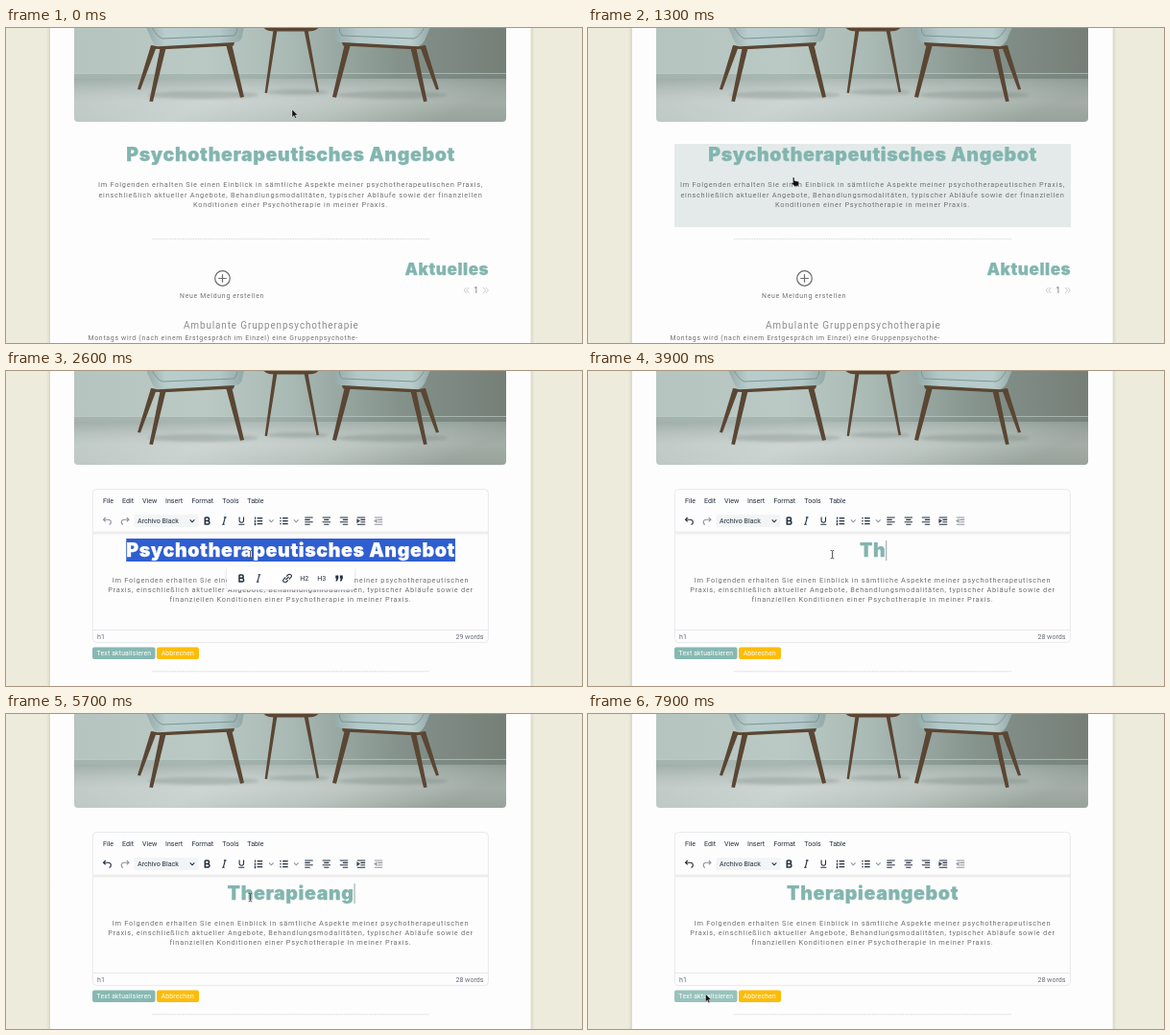
These frames come from a looping animation (600 px wide and 329 px high, 8000 ms). An HTML page:

```html
<!DOCTYPE html>
<html lang="de">
<head>
<meta charset="utf-8">
<title>Text bearbeiten</title>
<style>
html, body { margin: 0; width: 100%; height: 100%; overflow: hidden; background: #edeadc; }
svg { display: block; width: 100vw; height: 100vh; }
text { font-family: Roboto, "Liberation Sans", sans-serif; white-space: pre; }
.h { font-family: Inter, Roboto, sans-serif; font-weight: 900; font-size: 19.6px; letter-spacing: .6px; fill: #82b5af; stroke: #82b5af; stroke-width: .25; text-anchor: middle; }
.h.sel { fill: #fff; stroke: #fff; }
.p { font-size: 7.4px; letter-spacing: .735px; fill: #707070; text-anchor: middle; }
.s { font-size: 6.9px; letter-spacing: .71px; fill: #707070; }
.m { font-size: 7.1px; fill: #222f3e; }
.b { font-size: 6.8px; letter-spacing: .2px; fill: #fff; }
.i { fill: none; stroke: #222f3e; stroke-width: 1.1; }
.wood { fill: #5a4633; }
.thin { fill: none; stroke: #e3e4e6; stroke-width: .8; }
</style>
</head>
<body>
<svg viewBox="0 0 600 329" preserveAspectRatio="none">
  <defs>
    <linearGradient id="wall">
      <stop offset="0" stop-color="#b5c4bf"/><stop offset=".3" stop-color="#bac9c4"/>
      <stop offset=".5" stop-color="#a9b9b4"/><stop offset=".75" stop-color="#84928b"/>
      <stop offset="1" stop-color="#757f78"/>
    </linearGradient>
    <linearGradient id="floor" x2="1" y2=".2">
      <stop offset="0" stop-color="#b2beba"/><stop offset=".4" stop-color="#c5cfcc"/>
      <stop offset=".72" stop-color="#b3beb9"/><stop offset="1" stop-color="#949f98"/>
    </linearGradient>
    <linearGradient id="sheen" x2="0" y2="1">
      <stop offset="0" stop-color="#70817b" stop-opacity=".28"/><stop offset=".55" stop-color="#fff" stop-opacity=".14"/>
      <stop offset="1" stop-color="#fff" stop-opacity=".04"/>
    </linearGradient>
    <linearGradient id="seat" x2="1">
      <stop offset="0" stop-color="#94a9a8"/><stop offset=".2" stop-color="#b9cdcd"/>
      <stop offset=".75" stop-color="#b2c8c8"/><stop offset="1" stop-color="#92a8a7"/>
    </linearGradient>
    <linearGradient id="edge">
      <stop offset="0" stop-color="#8a8670" stop-opacity="0"/><stop offset="1" stop-color="#8a8670" stop-opacity=".2"/>
    </linearGradient>
    <filter id="soft" x="-20%" y="-40%" width="140%" height="180%"><feGaussianBlur stdDeviation="1.8"/></filter>
    <clipPath id="photo"><rect x="71" y="-10" width="450" height="108" rx="4"/></clipPath>
  </defs>

  <rect width="600" height="329" fill="#edebdc"/>
  <rect x="42" width="4" height="329" fill="url(#edge)"/>
  <rect width="4" height="329" fill="url(#edge)" transform="translate(550.5 0) scale(-1 1)"/>
  <rect x="46" width="500.5" height="329" fill="#fefdfe"/>

  <g clip-path="url(#photo)">
    <rect x="71" width="450" height="54" fill="url(#wall)"/>
    <rect x="71" y="47" width="450" height="6" fill="#7a8a84" opacity=".3"/>
    <rect x="71" y="47" width="450" height="1" fill="#d5dfdb" opacity=".5"/>
    <rect x="71" y="53" width="450" height="45" fill="url(#floor)"/>
    <rect x="71" y="53" width="450" height="45" fill="url(#sheen)"/>
    <g fill="#66756f" opacity=".28" filter="url(#soft)">
      <ellipse cx="205" cy="70" rx="58" ry="4"/><ellipse cx="304" cy="67" rx="32" ry="3"/>
      <ellipse cx="402" cy="70" rx="58" ry="4"/>
    </g>
    <g id="chair">
      <path class="wood" d="M151 18L157 19L140 64.5L137 64ZM161 19L167 19L153 77L149.3 76.5ZM229 17L235 16L248 72L244 72.8Z"/>
      <path fill="url(#seat)" d="M146 -1H248L246 9Q245 14 239 15L163 20Q156 20 152 13Z"/>
      <path class="wood" d="M152 18.5Q156 19.5 163 19L238 15L237 18.5L164 22.3L151 21.5Z"/>
      <path d="M152 -1Q157 9 163 11L238 8Q241 4 241 -1" fill="none" stroke="#7f9493" stroke-width="1"/>
    </g>
    <use href="#chair" transform="translate(588 0) scale(-1 1)"/>
    <path class="wood" d="M278.5 2H282.5L272 68L269.6 67.8ZM310.5 2H314.5L326 66.8L323.6 67.2Z"/>
    <path class="wood" d="M267 -2H327Q324 3.5 314 3.5H280Q270 3.5 267 -2Z"/>
  </g>

  <g id="view">
    <rect id="hover" x="90" y="121" width="413" height="87" fill="#e4eae9"/>
    <text class="h" x="296.6" y="139.3">Psychotherapeutisches Angebot</text>
    <g id="intro"></g>
    <path d="M152 220.3H441" stroke="#cfcfcf" stroke-width=".8" stroke-dasharray="1 .6"/>
    <circle cx="225.5" cy="261.5" r="7.8" fill="none" stroke="#6b6b6b" stroke-width="1.2"/>
    <path d="M221.2 261.5H229.8M225.5 257.2V265.8" stroke="#6b6b6b" stroke-width="1.2"/>
    <text class="s" x="181" y="281.8">Neue Meldung erstellen</text>
    <text class="h" x="459.3" y="257.8" style="font-size:17px">Aktuelles</text>
    <path d="M479.6 271L477 274L479.6 277M482.4 271L479.8 274L482.4 277M497 271L499.6 274L497 277M499.8 271L502.4 274L499.8 277" fill="none" stroke="#c4c4c4" stroke-width=".9"/>
    <text x="487.2" y="277" font-size="8.5" fill="#707070">1</text>
    <text x="185" y="313.8" font-size="10" letter-spacing=".84" fill="#8c8c8c">Ambulante Gruppenpsychotherapie</text>
    <text class="s" x="85.5" y="326.4">Montags wird (nach einem Erstgespräch im Einzel) eine Gruppenpsychothe-</text>
  </g>

  <g id="editor">
    <rect class="thin" x="90.4" y="123.6" width="412" height="160" rx="4" style="fill:#fefdfe"/>
    <path d="M91 169H502" stroke="#000" stroke-opacity=".06" stroke-width="3"/>
    <path class="thin" d="M90.5 270.5H502.5"/>
    <g id="menu"></g>
    <rect x="133.5" y="150" width="67" height="13" rx="1.5" fill="#f3f4f6"/>
    <text class="m" x="137" y="159.2">Archivo Black</text>
    <g id="tools"></g>
    <rect id="mark" y="175" height="24" fill="#2f5ed0"/>
    <text class="h" id="title" x="296.6" y="193.8"></text>
    <rect id="caret" y="177" width=".9" height="21" fill="#8a9a9a"/>
    <g id="draft"></g>
    <text class="m" x="95" y="279.6" style="fill:#666d76">h1</text>
    <text class="m" id="words" x="497.5" y="279.6" text-anchor="end" style="fill:#666d76"></text>
    <rect id="save" x="90" y="288.5" width="65.5" height="12.5" rx="2"/>
    <text class="b" x="94.6" y="297.2">Text aktualisieren</text>
    <rect x="157" y="288.5" width="44" height="12.5" rx="2" fill="#fdbc08"/>
    <text class="b" x="161.7" y="297.2">Abbrechen</text>
    <path d="M152 313.8H441" stroke="#cfcfcf" stroke-width=".8" stroke-dasharray="1 .6"/>
    <g id="popup">
      <rect x="230" y="205.5" width="133" height="24" rx="3" fill="#556" opacity=".28" filter="url(#soft)"/>
      <rect x="230" y="204" width="133" height="24.5" rx="3" fill="#fff"/>
      <g id="quick"></g>
    </g>
  </g>

  <g id="arrow"><path d="M0 0V8.2L1.9 6.5L3.2 9.3L4.5 8.7L3.3 6H5.8Z" fill="#111" stroke="#fff" stroke-width=".4"/></g>
  <g id="hand"><path d="M.2 .3Q1.2 -.6 2 .5V3.4L6 4.3Q7 4.7 6.8 6L6 9.2H2.2L-1 6.2Q-1.2 5 0 5.2L.6 5.8Z" fill="#111" stroke="#fff" stroke-width=".4"/></g>
  <g id="beam"><path d="M-1.8 -4.2Q0 -4.2 0 -3Q0 -4.2 1.8 -4.2M0 -3V3.4M-1.8 4.4Q0 4.4 0 3.2Q0 4.4 1.8 4.4" fill="none" stroke="#4a4a4a" stroke-width=".9"/></g>
</svg>
<script>
const $ = id => document.getElementById(id);
const LOOP = 8000, MID = 296.6;
const OLD = 'Psychotherapeutisches Angebot', NEW = 'Therapieangebot';

// Static text and toolbar icons
const lines = (id, y, rows) => $(id).innerHTML = rows.map((s, i) =>
  `<text class="p" x="296.5" y="${y + i * 10.4}">${s}</text>`).join('');
lines('intro', 166.3, [
  'Im Folgenden erhalten Sie einen Einblick in sämtliche Aspekte meiner psychotherapeutischen Praxis,',
  'einschließlich aktueller Angebote, Behandlungsmodalitäten, typischer Abläufe sowie der finanziellen',
  'Konditionen einer Psychotherapie in meiner Praxis.']);
lines('draft', 220.5, [
  'Im Folgenden erhalten Sie einen Einblick in sämtliche Aspekte meiner psychotherapeutischen',
  'Praxis, einschließlich aktueller Angebote, Behandlungsmodalitäten, typischer Abläufe sowie der',
  'finanziellen Konditionen einer Psychotherapie in meiner Praxis.']);

$('menu').innerHTML = [['File', 101], ['Edit', 121], ['View', 142], ['Insert', 166], ['Format', 193.4],
  ['Tools', 225.3], ['Table', 251.3]].map(([s, x]) => `<text class="m" x="${x}" y="138">${s}</text>`).join('');

const icon = (x, y, d, extra = '') => `<path class="i" ${extra} transform="translate(${x} ${y})" d="${d}"/>`;
const GREY = 'style="stroke:#8d949c"', HEAVY = 'style="stroke-width:1.5"';
const BOLD = 'M-2 -3.6H.4Q2.2 -3.6 2.2 -1.9T.4 -.2H-2M.4 -.2Q2.6 -.2 2.6 1.7T.4 3.5H-2V-3.6';
const ITALIC = 'M-.4 -3.7H2.2M-2.2 3.7H.4M1 -3.7L-1 3.7';
const UNDER = 'M-2.2 -4V-.4Q-2.2 1.8 0 1.8T2.2 -.4V-4M-3 3.8H3';
const CHEVRON = 'M-2.3 -1.2L0 1.2L2.3 -1.2';
const LIST = 'M-1.4 -3H4.2M-1.4 0H4.2M-1.4 3H4.2';
const DOTS = 'M-4.2 -3H-2.8M-4.2 0H-2.8M-4.2 3H-2.8';
const NUMS = 'M-3.4 -4.2V-1.8M-4.2 -.2H-2.8M-4.2 1.2H-2.8M-4.2 2.8H-2.8M-4.2 4H-2.8';
const UNDO = 'M-1.8 -3.6L-4 -1.4L-1.8 .8M-4 -1.4H1Q3.8 -1.2 3.8 1.2T2 3.8';
const REDO = 'M1.8 -3.6L4 -1.4L1.8 .8M4 -1.4H-1Q-3.8 -1.2 -3.8 1.2T-2 3.8';
const LINK = 'M-.8 -2L1 -3.8Q2.4 -4.8 3.8 -3.6T3.6 -.8L1.8 1M.8 2L-1 3.8Q-2.4 4.8 -3.8 3.6T-3.6 .8L-1.8 -1M-1.6 1.6L1.6 -1.6';
const INDENT = 'M-4.2 -3.6H4.2M-.6 -1.2H4.2M-.6 1.2H4.2M-4.2 3.6H4.2';
// Four rows; a and b give the ends of the short ones
const align = (a, b) => `M-4.2 -3.6H4.2M${a} -1.2H${b}M-4.2 1.2H4.2M${a} 3.6H${b}`;
const Y = 156.6;
$('tools').innerHTML =
  icon(105.5, Y, UNDO, 'id="undo"') + icon(124, Y, REDO, GREY) + icon(194, Y, CHEVRON) +
  icon(209.3, Y, BOLD, HEAVY) + icon(227.3, Y, ITALIC) + icon(245.3, Y - .2, UNDER) +
  icon(263, Y, LIST + NUMS) + icon(276.3, Y, CHEVRON, GREY) +
  icon(289.5, Y, LIST + DOTS) + icon(302.3, Y, CHEVRON, GREY) +
  icon(315.5, Y, align(-4.2, 1.2)) + icon(333.8, Y, align(-2.6, 2.6)) + icon(352, Y, align(-1.2, 4.2)) +
  icon(370, Y, INDENT + 'M-4 -1.4L-2 0L-4 1.4Z') + icon(388, Y, INDENT + 'M-2 -1.4L-4 0L-2 1.4Z', GREY);

const quote = x => `<path d="M${x} 213.6h3v3l-1.3 3h-1.7l1 -2.8h-1z" fill="#222f3e"/>`;
$('quick').innerHTML = icon(245, 216.5, BOLD, HEAVY) + icon(263, 216.5, ITALIC) + icon(293, 216.5, LINK) +
  '<text class="m" x="306.3" y="219">H2</text><text class="m" x="324.3" y="219">H3</text>' + quote(343.3) + quote(347.8);

// Pointer route: time, x, y
const ROUTE = [[100, 298, 85], [700, 195, 117], [1200, 213, 156], [1700, 213, 156],
  [2200, 254.5, 191.5], [6500, 254.5, 191.5], [7300, 122.5, 292.5]];
const ease = k => k * k * (3 - 2 * k);
function pointerAt(t) {
  const i = ROUTE.findIndex(p => p[0] > t);
  if (i === 0) return ROUTE[0].slice(1);
  if (i < 0) return ROUTE.at(-1).slice(1);
  const [t0, x0, y0] = ROUTE[i - 1], [t1, x1, y1] = ROUTE[i];
  const k = ease((t - t0) / (t1 - t0));
  return [x0 + (x1 - x0) * k, y0 + (y1 - y0) * k];
}

// Steady typing, a little quicker towards the end
function typedAt(t) {
  if (t < 3700) return 0;
  const n = t < 5700 ? 1 + (t - 3700) / 200 : 11 + (t - 5700) / 150;
  return Math.min(NEW.length, Math.floor(n));
}

const show = (id, on) => $(id).style.display = on ? '' : 'none';

function draw(t) {
  const editing = t >= 1700, marked = t >= 2400 && t < 3700, typing = t >= 3700;
  const [x, y] = pointerAt(t);
  const inBox = !editing && y > 121;
  show('view', !editing);
  show('editor', editing);
  show('hover', inBox);

  const title = $('title');
  title.textContent = typing ? NEW.slice(0, typedAt(t)) : OLD;
  title.classList.toggle('sel', marked);
  $('words').textContent = typing ? '28 words' : '29 words';
  $('undo').style.stroke = typing ? '#222f3e' : '#8d949c';
  show('mark', marked);
  show('popup', t >= 2500 && t < 3700);
  if (editing) {
    const w = title.getComputedTextLength();
    $('mark').setAttribute('x', MID - w / 2);
    $('mark').setAttribute('width', w);
    $('caret').setAttribute('x', MID + w / 2);
  }
  show('caret', typing && (t < 6300 || (t - 6300) % 1000 < 500));

  const onSave = editing && x > 90 && x < 155.5 && y > 288.5 && y < 301;
  $('save').setAttribute('fill', onSave ? '#98c2bc' : '#86b8b2');

  const shape = inBox ? 'hand' : editing && y > 170 && y < 270 ? 'beam' : 'arrow';
  for (const id of ['arrow', 'hand', 'beam']) show(id, id === shape);
  $(shape).setAttribute('transform', `translate(${x} ${y})`);
}

const start = performance.now();
function tick() {
  const t = Math.max(0, performance.now() - start) % LOOP;
  draw(Math.floor(t / 100) * 100);
  requestAnimationFrame(tick);
}
tick();
</script>
</body>
</html>
```
